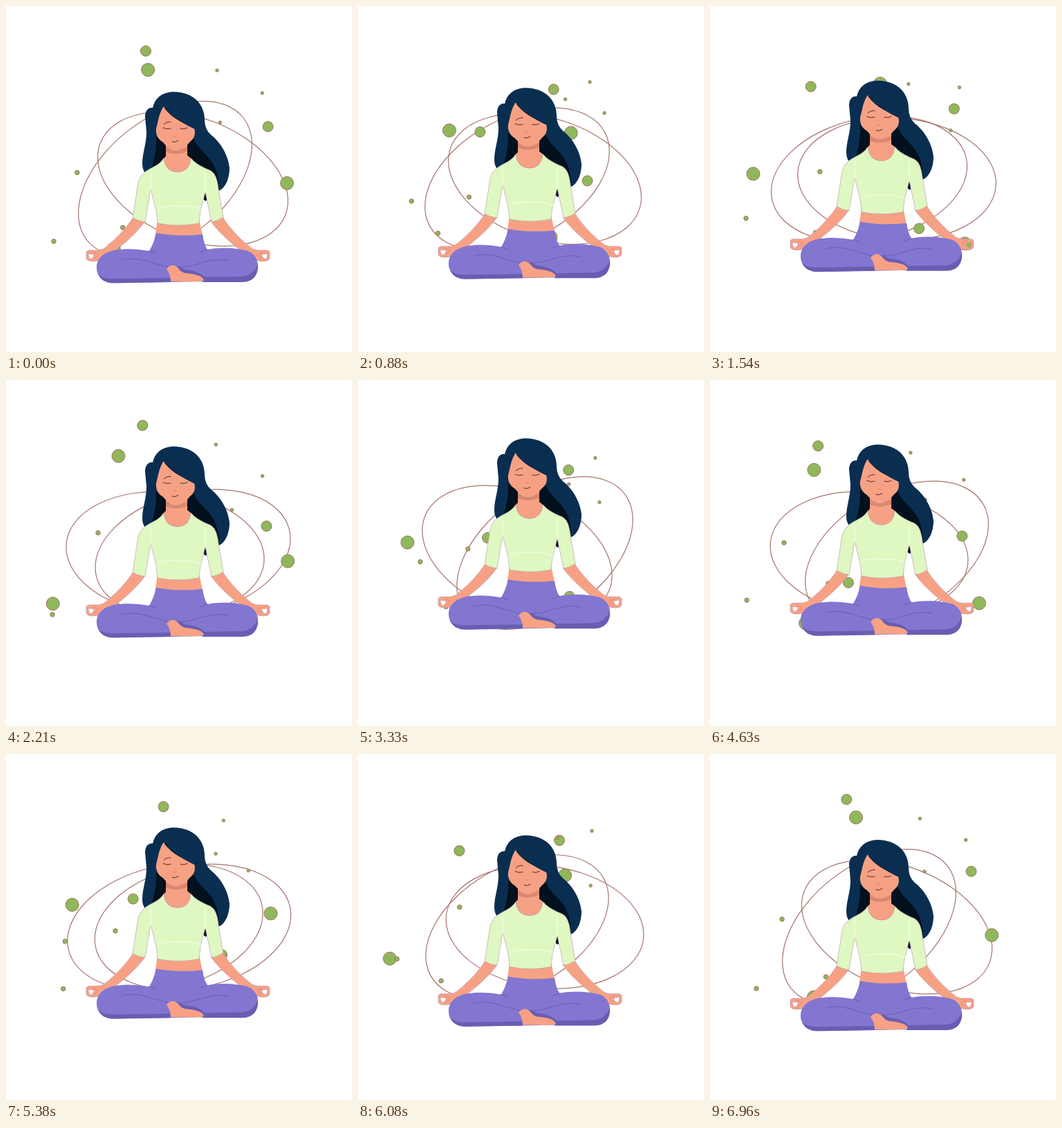
Animation, 500 px wide and 500 px high, one loop 7 s. Source, as an HTML page:

```html
<!DOCTYPE html>
<html lang="en">
<head>
<meta charset="utf-8">
<title>Meditation</title>
<style>
html, body { margin: 0; width: 100%; height: 100%; overflow: hidden; background: #fff; }
svg { display: block; width: 100vw; height: 100vh; }
.ring { fill: none; stroke: #a8736c; stroke-width: 1.2; }
.dot { fill: #8fb85c; stroke: #a3705c; }
.skin { fill: #f7a184; }
.arm { stroke: #b890b4; stroke-width: .6; }
.shirt { fill: #dff7c1; }
.hair { fill: #0a2e50; }
.dark { fill: #03101d; }
.pants { fill: #8276d1; }
.under { fill: #695db2; }
.line { fill: none; stroke-linecap: round; }
.face { stroke: #4a2a33; stroke-width: 1; }
.fold { stroke: #695db2; stroke-width: 1; }
.seam { stroke: #eefcdc; stroke-width: 1.6; }
</style>
</head>
<body>
<svg viewBox="0 0 500 500">
  <defs>
    <g id="arm">
      <path class="skin arm" fill-rule="evenodd" d="M184 305C176 318 162 334 146 347Q141 352 134 353L120 353Q115 354 116 358L116 365Q118 369 125 369Q136 369 145 363C163 350 187 331 201 311Z
        M119 358L127 359Q128 363 122 366Q119 363 119 358Z"/>
      <path class="line" stroke="#dc8068" stroke-width=".8" d="M126 356L133 359M128 364L133 361"/>
    </g>
  </defs>
  <ellipse class="ring" cx="230" cy="250" rx="143.5" ry="88"/>
  <ellipse class="ring" cx="270" cy="250" rx="143.5" ry="88"/>
  <g id="dots"></g>
  <g id="woman">
    <path class="hair" d="M212 147C205 146 201 152 201 160L203 182C203 200 197 212 197 228Q197 237 202 242L235 240L290 240L308 267C318 262 323 248 323 234C321 214 309 196 296 186Q287 178 287 164C287 146 275 124 241 124C224 125 215 134 212 147Z"/>
    <path class="dark" d="M217 188Q218 210 211 233L232 226L231 200ZM270 188C276 208 296 216 303 236Q308 250 308 266L297 268L289 282L286 280L286 236L262 222V204Z"/>
    <use href="#arm"/>
    <use href="#arm" transform="matrix(-1 0 0 1 497 0)"/>
    <path class="skin" d="M219 308H279L285 336H215ZM231 198H262V216L270 222Q262 244 247 242Q232 242 226 222L231 217Z"/>
    <path fill="#d78a72" d="M231 203Q246 212 262 203V210Q246 217 231 211Z"/>
    <path class="skin" d="M227 146C220 158 220 168 217 177C216 186 220 193 227 197C233 204 238 209 245 209C253 209 260 203 266 196C273 191 274 184 272 176L254 160L232 143Z"/>
    <path class="hair" d="M225 148L228 145C234 157 252 168 273 178L284 170L272 138L240 128Z"/>
    <path class="line" stroke="#03101d" stroke-width=".9" d="M229 147C235 155 242 161 252 166"/>
    <path class="line" stroke="#f7a184" stroke-width=".7" d="M228 148C233 156 238 161 245 164"/>
    <path class="line face" d="M227 176Q232 179 238 177M252 177Q257 179 262 176M228 171Q232 167 238 167.500M240 196Q245 198 249 194.500"/>
    <path class="line" stroke="#d97f6a" d="M242 188Q244 190 246 188"/>
    <path class="shirt arm" d="M228 220Q230 240 248 240Q265 240 267 220C273 227 284 233 294 237C305 242 306 256 308 270L314 305Q306 311 297 312L288 269L281 296L279 314Q249 320 219 314L217 296L209 264L201 312Q191 311 183 306L189 268C191 250 194 244 205 237C213 232 221 230 228 220Z"/>
    <path class="line seam" d="M209 238V266M288 240V270M219 293Q235 287 248 290Q262 287 283 294"/>
    <path class="pants" d="M217 328Q249 334 284 330Q286 344 291 352C310 348 338 350 352 355C362 361 365 370 364 380C362 392 354 398 342 398H285L238 399L155 400C140 399 131 391 131 378C131 364 142 356 156 353C172 350 191 351 207 354Q214 342 217 328Z"/>
    <path class="under" d="M133 387C140 395 150 394 165 394L238 393V399L155 400.500Q138 400 133 387ZM364 373Q365 398 342 399H284V392L340 391C353 390 359 384 364 373Z"/>
    <path class="under" d="M244 376Q252 376 258 381Q278 382 287 392L284 394L255 388Z"/>
    <path class="line fold" d="M168 367C190 361 207 371 234 377M250 377C278 378 290 362 321 368M291 352L280 356M207 354L216 357"/>
    <path class="skin" d="M232 380Q237 374 243 375C250 377 250 384 259 386C270 387 285 389 286 397Q272 399 262 398L238 398Q238 388 232 380Z"/>
  </g>
</svg>
<script>
const LOOP = 7000, FRAMES = 168, NS = 'http://www.w3.org/2000/svg';
const make = (tag, attrs) => {
  const el = document.createElementNS(NS, tag);
  for (const key in attrs) el.setAttribute(key, attrs[key]);
  return el;
};

// Closed three-lobed track, travelled at constant speed
const knots = [[202,65],[226,75],[252,99],[282,120],[304,130],[346,145],[373,163],[378,172],[381,192],
  [377,210],[365,225],[332,252],[316,278],[306,312],[293,336],[269,348],[240,339],[216,318],[200,293],
  [194,270],[187,228],[178,186],[164,164],[148,144],[145,120],[155,97],[173,77]];
const at = i => knots[(i + knots.length) % knots.length];
const handle = (i, sign) => at(i).map((v, k) => v + sign * (at(i + 1)[k] - at(i - 1)[k]) / 6);
const track = make('path', {
  d: 'M' + at(0) + knots.map((_, i) => `C${handle(i, 1)} ${handle(i + 1, -1)} ${at(i + 1)}`).join('')
});
const trackLength = track.getTotalLength();

// Each swarm reuses the track: w = (p + qi) * z + (e + fi), mirrored when flip is -1
const swarms = [
  { r: 7.5, p: 1, q: 0, e: 0, f: 0, flip: 1 },
  { r: 9.5, p: -.4078, q: -1.1797, e: 565.1, f: 467.8, flip: -1 },
  { r: 2.2, p: .3502, q: -.0306, e: 232.3, f: 76.4, flip: 1 },
  { r: 3.2, p: .4586, q: .1709, e: -34.7, f: 335.3, flip: -1 }
];
const leads = [0, 45, 114];
const layer = document.getElementById('dots');
for (const s of swarms) {
  s.dots = leads.map(() => layer.appendChild(make('circle', { class: 'dot', r: s.r })));
}

const woman = document.getElementById('woman');
const rings = [...document.querySelectorAll('.ring')];
const tilt = (ring, deg) =>
  ring.setAttribute('transform', `rotate(${-deg} ${ring.getAttribute('cx')} 250)`);

function draw(ms) {
  const frame = Math.floor(ms % LOOP * .024 + .1) % FRAMES;
  const wave = shift => Math.cos(2 * Math.PI * (frame + shift) / FRAMES);

  woman.setAttribute('transform', `translate(0 ${20 * wave(0) - 20})`);
  tilt(rings[0], 8 + 30 * wave(1.5));
  tilt(rings[1], 8 - 30 * wave(-6));

  leads.forEach((lead, i) => {
    const pt = track.getPointAtLength((frame + lead) % FRAMES / FRAMES * trackLength);
    for (const { p, q, e, f, flip, dots } of swarms) {
      const y = pt.y * flip;
      dots[i].setAttribute('cx', p * pt.x - q * y + e);
      dots[i].setAttribute('cy', q * pt.x + p * y + f);
    }
  });
}

const start = performance.now();
function tick() {
  draw(performance.now() - start);
  requestAnimationFrame(tick);
}
tick();
</script>
</body>
</html>
```
